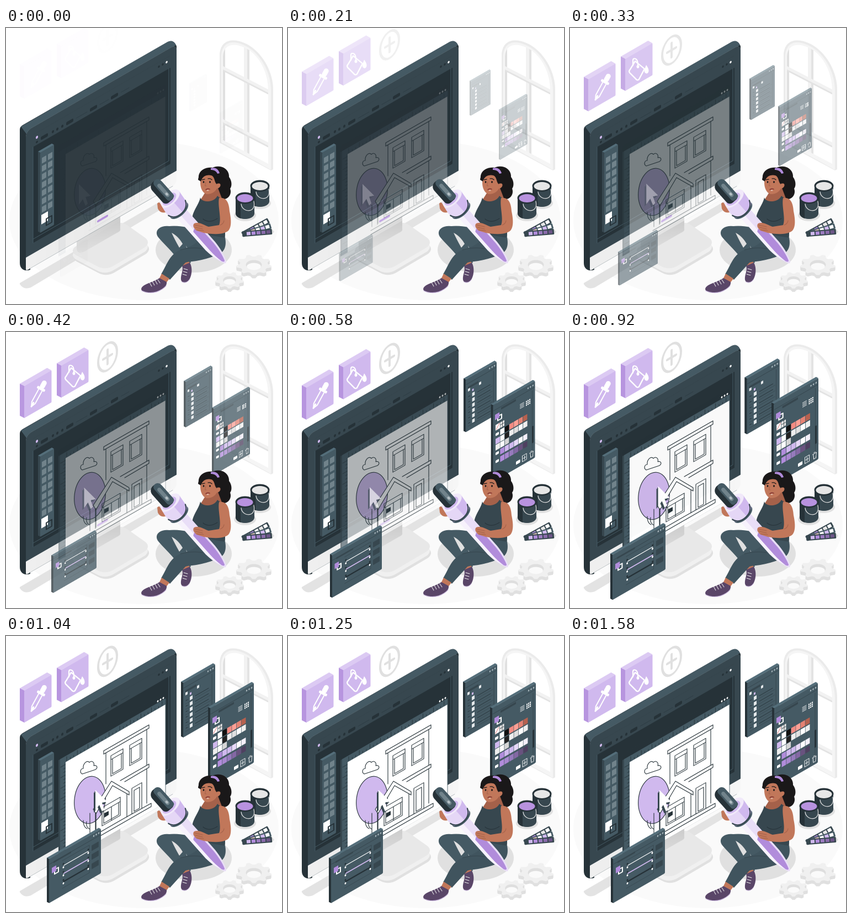
These frames come from a looping animation (500x500 px, 1620 ms). An HTML page with a canvas:

```html
<!DOCTYPE html>
<html lang="en">
<head>
<meta charset="utf-8">
<title>Design workspace</title>
<style>
html, body { margin: 0; width: 100%; height: 100%; overflow: hidden; background: #fff; }
canvas { display: block; width: 500px; height: 500px; }
</style>
</head>
<body>
<canvas id="stage"></canvas>
<script>
const LOOP = 1620, SIZE = 500, SLOPE = -0.577;
const INK = '#263238', DARK = '#37474f', SLATE = '#455a64', LILAC = '#d0b9ee', PURPLE = '#b18cdb';
let c;

// Drawing helpers, all working on the current context
const fill = (d, color) => { c.fillStyle = color; c.fill(new Path2D(d)); };
const line = (d, color = INK, width = 1.1) => {
  c.strokeStyle = color; c.lineWidth = width; c.lineJoin = c.lineCap = 'round';
  c.stroke(new Path2D(d));
};
const box = (x, y, w, h, color, r = 0) => {
  c.fillStyle = color; c.beginPath(); c.roundRect(x, y, w, h, r); c.fill();
};
const oval = (x, y, rx, ry, color, turn = 0) => {
  c.fillStyle = color; c.beginPath(); c.ellipse(x, y, rx, ry, turn, 0, 7); c.fill();
};
const at = (x, y, draw, turn = 0) => {
  c.save(); c.translate(x, y); c.rotate(turn); draw(); c.restore();
};
const iso = (x, y, draw) => {
  c.save(); c.transform(1, SLOPE, 0, 1, x, y); draw(); c.restore();
};
function layer(draw) {
  const canvas = document.createElement('canvas');
  canvas.width = canvas.height = SIZE * 2;
  c = canvas.getContext('2d');
  c.scale(2, 2);
  draw();
  return canvas;
}
function slab(x, y, w, h, face, side, top, draw, depth = 4) {
  const rise = depth * 0.55, right = y + w * SLOPE;
  fill(`M${x - depth} ${y - rise}L${x + w - depth} ${right - rise}L${x + w} ${right}L${x} ${y}z`, top);
  fill(`M${x - depth} ${y - rise}L${x + .5} ${y}V${y + h}L${x - depth} ${y + h - rise}z`, side);
  iso(x, y, () => { box(0, 0, w, h, face, 1.5); draw(); });
}

function gear(x, y, r) {
  const ring = (dy, color) => {
    c.beginPath();
    for (let i = 0; i < 36; i++) {
      const a = (i + .5) * Math.PI / 18, k = i % 4 < 2 ? r : r * .8;
      c.lineTo(x + Math.cos(a) * k, y + dy + Math.sin(a) * k * .58);
    }
    c.closePath(); c.fillStyle = color; c.fill();
  };
  for (let d = 6; d > 0; d--) ring(d, '#e0e0e0');
  ring(0, '#f0f0f0');
  oval(x, y, r * .45, r * .27, '#dedede');
  oval(x, y + 3, r * .4, r * .2, '#fafafa');
}

function bucket(x, y, paint) {
  oval(x, y + 31, 20, 11, '#e0e0e0');
  fill(`M${x - 17} ${y}V${y + 28}a17 10 0 0 0 34 0V${y}z`, DARK);
  fill(`M${x - 17} ${y}V${y + 28}a17 10 0 0 0 9 9V${y}z`, INK);
  oval(x, y, 17.5, 10.5, INK);
  oval(x, y + .5, 14.5, 7.5, paint);
  line(`M${x - 7} ${y + 11}C${x - 5} ${y + 27} ${x + 21} ${y + 28} ${x + 16} ${y + 6}`, '#e6e6e6', 1.2);
}

function archedWindow() {
  fill('M387 208V47C389 22 410 16 436 29C463 43 484 78 484 112V256L480 258z', '#ebebeb');
  fill('M390 207V49C392 25 411 20 435 33C461 46 480 80 480 113V257z', '#f5f5f5');
  c.save();
  c.clip(new Path2D('M393 203V52C394 30 412 25 435 37C460 50 475 82 475 113V246z'));
  c.fillStyle = '#fff'; c.fillRect(380, 10, 110, 250);
  fill('M393 30h4v180h-4z', '#e0e0e0');
  fill('M431 20h10v230h-10z', '#f2f2f2');
  fill('M437 20h4v230h-4z', '#e3e3e3');
  for (const y of [69, 165]) {
    fill(`M393 ${y}L480 ${y + 45}v8L393 ${y + 8}z`, '#f2f2f2');
    fill(`M393 ${y + 6}L480 ${y + 51}v3L393 ${y + 9}z`, '#e3e3e3');
  }
  c.restore();
}

function swatchFan() {
  const tints = [['#fff', PURPLE, '#fff', '#e6e6e6', '#fff'], [LILAC, '#f3c9c2', '#fff', LILAC, '#fff'],
    [LILAC, PURPLE, '#9b7bbf', '#8a6bab', '#6d5688']];
  fill('M426 377L482 374L486 369L470 352z', '#e0e0e0');
  tints.forEach((row, i) => at(431, 373, () => {
    box(-3, -5, 54, 10, i % 2 ? SLATE : DARK, 1.5);
    row.forEach((tint, k) => box(5 + k * 9, -3, 7, 6, tint));
  }, -.5 + i * .21));
}

function monitor() {
  fill('M25 462L285 311V326L45 470Q32 475 25 464z', '#e3e3e3');
  const base = 'M126 396L196 356Q208 350 218 356L252 380Q262 388 252 397L196 430Q180 440 164 431L126 411Q116 403 126 396z';
  at(2, 12, () => fill(base, '#e0e0e0'));
  at(0, 8, () => fill(base, '#f0f0f0'));
  fill(base, '#e8e8e8');
  const neck = c.createLinearGradient(0, 345, 0, 405);
  neck.addColorStop(0, '#cbcbcb'); neck.addColorStop(1, '#e0e0e0');
  fill('M128 380L207 335V364Q208 368 201 371L142 405Q128 411 128 398z', neck);

  fill('M25 184Q25 179 30 176L293 25Q304 20 309 33L309 50L44 200V438Q36 441 30 437Q25 433 25 426z', INK);
  fill('M27 178.5L293 25Q303 20 308 31L50 181Q40 186 37 192z', SLATE);
  iso(36, 187, () => {
    const chin = c.createLinearGradient(0, 0, 273, 0);
    chin.addColorStop(0, '#f0f0f0'); chin.addColorStop(.5, '#e8e8e8'); chin.addColorStop(1, '#f7f7f7');
    box(0, 0, 273, 253, chin, [10, 10, 8, 3]);
    box(0, 0, 273, 229, DARK, [10, 10, 0, 0]);
    line('M4 253H266', '#9fa8ac', .7);
    box(13, 14, 249, 196, INK);
    box(13, 14, 249, 22, DARK);
    line('M259 36V203H13', SLATE, 1);
    line('M13 36V210', '#4b626d', .8);
    box(18, 20, 4, 5, LILAC, 2);
    box(18, 29, 4, 4, INK, 2);
    for (const u of [27, 73, 116, 154]) box(u, 26, 13, 6, INK, 2);
    for (const u of [49, 57, 66]) oval(u, 29, 2, 2.5, INK);
    line('M91 29h20M134 29h16M173 29h14', '#2e3d45', 1);
    for (const u of [241, 248, 255]) oval(u, 22, 1.7, 2, u > 250 ? '#fff' : INK);
    line('M131 238.5h16', PURPLE, 4);
  });

  slab(62, 226, 25, 145, SLATE, DARK, '#546e7a', () => {
    for (let i = 0; i < 14; i++) box(3 + i % 2 * 11, 11 + (i >> 1) * 14.8, 8, 10.5, '#71838b', .5);
    box(2, 114, 12, 17, '#fff');
    c.strokeStyle = INK; c.lineWidth = 2; c.strokeRect(11, 126, 10, 12);
  });
}

function houseDrawing() {
  oval(152, 297, 28, 43, LILAC, .13);
  c.lineWidth = 1.1; c.strokeStyle = INK;
  c.beginPath(); c.ellipse(152, 297, 28, 43, .13, 0, 7); c.stroke();
  line('M152 321V360M162 318V356M140 334Q140 346 147 349M146 336Q144 346 152 350');
  line('M138 250C133 247 135 240 140 240C139 231 147 224 151 229C156 224 161 230 159 235C165 233 167 239 162 242z');
  line('M177 208L259 161V167L177 214zM181 212V268M255 169V234');
  for (const [x, y] of [[190, 217], [224, 198]]) iso(x, y, () => {
    line('M0 0H22V37H0zM0 7H22M3 7V34M19 7V34M3 34H19');
  });
  line('M207 262L259 232V238L215 264M255 241V303');
  fill('M158 314L191 263L223 282V288L193 271L163 322z', '#fff');
  line('M158 314L191 263L223 282V288L193 271L163 322zM219 286V328M163 320V354');
  iso(228, 276, () => line('M0 46V0H18V46M4 44V6H14V44z'));
  iso(174, 311, () => line('M0 0H33V33H0zM0 8H33M17 8V33M3 8V30H30V8'));
  line('M218 328L263 303V309L150 374M218 328L150 367');
  fill('M178 321L186 317V324L178 329z', INK);
}

function appWindow() {
  iso(95, 214, () => {
    box(0, 0, 194, 200, DARK, [3, 3, 0, 0]);
    box(0, 0, 194, 11, INK, [3, 3, 0, 0]);
    box(3, 11, 191, 11, SLATE);
    box(3, 11, 10, 189, SLATE);
    for (const u of [180, 185, 190]) oval(u, 8, 1.4, 1.8, '#fff');
    for (let i = 0; i < 28; i++) line(`M${15 + i * 6.4} 21v${i % 3 ? -3 : -8}`, INK, .8);
    for (let i = 0; i < 27; i++) line(`M13 ${26 + i * 6.4}h${i % 3 ? -4 : -9}`, INK, .8);
    box(13, 22, 181, 178, '#fff');
    line('M194 12V196', SLATE, .8);
  });
  houseDrawing();
}

function pointer() {
  const arrow = 'M162 279L183 300L174 302L178 314L174 318L169 306L162 316z';
  at(-3, 4, () => fill(arrow, DARK));
  at(-1.5, 2, () => fill(arrow, DARK));
  fill(arrow, '#fff');
}

function icons() {
  for (const [x, y] of [[33, 99], [100, 62]])
    slab(x, y, 49.5, 58, LILAC, '#b795df', '#dccaf3', () => {}, 8);
  // Eyedropper
  at(58, 114, () => {
    box(-4.5, -28, 9, 16, '#fff', 4.5);
    box(-8, -14, 16, 5, '#fff', 2);
    line('M-3.5 -9V17L0 25L3.5 17V-9', '#fff', 2);
    line('M0 17V25', '#fff', 3);
  }, .5);
  // Paint bucket
  line('M118 66L135 80L125 99Q122 102 119 98L108 87Q106 84 109 81z', '#fff', 2.4);
  line('M114 74V65Q114 60 119 62Q123 64 123 74', '#fff', 2.2);
  oval(123, 76, 2.5, 3, '#fff');
  fill('M138 73Q144 81 142 86Q139 91 135 86Q134 83 138 73z', '#fff');
  iso(184, 46, () => {
    c.strokeStyle = '#e0e0e0'; c.lineWidth = 4;
    c.beginPath(); c.ellipse(0, 0, 17, 24, 0, 0, 7); c.stroke();
    box(-10, -2.2, 20, 4.4, '#e0e0e0', 2); box(-2, -15, 4, 30, '#e0e0e0', 2);
  });
}

const dots = (u, v) => [0, 4.5, 9].forEach(k => oval(u + k, v, 1.2, 1.5, '#b0bcc1'));
function colorPair(u, v) {
  c.strokeStyle = '#fff'; c.lineWidth = 2; c.strokeRect(u + 5, v + 6, 7, 8);
  box(u, v, 8, 10, PURPLE);
}

function layersPanel() {
  slab(321, 85, 58, 99, SLATE, INK, '#546e7a', () => {
    dots(45, 5);
    line('M1 10H57M52 14V92', DARK, 1);
    box(4, 16, 20, 4, DARK, 1);
    box(4, 20, 4, 5, '#e4e8ea'); box(25, 20, 4, 5, '#e4e8ea'); box(12, 25, 3, 4, LILAC);
    for (let i = 0; i < 6; i++) {
      const v = 32 + i * 10;
      box(12, v, 5, 6.5, '#e4e8ea');
      line(`M22 ${v + 4}H46M5 ${v + 3}h3`, INK, .9);
      line(`M4 ${v + 8.5}H50`, DARK, .6);
    }
  });
}

function colorPanel() {
  const rows = [
    [40, 5, ['#fff', '#e8e8e8']],
    [53.5, 13.5, ['#fff', '#111', '#f28b82', '#ff9f94', '#e58273', '#b6614f']],
    [66, 5, [LILAC, '#fff', '#222', '#eee', '#e0e0e0', '#fff', '#eee']],
    [77.5, 5, ['#eee', '#fff', '#d5d5d5']],
    [90, 13.5, [PURPLE, LILAC, LILAC, '#e7d9f7', '#fff', '#f5f0fa']],
    [104, 13.5, [PURPLE, '#a887cf', '#967abc', '#8467a4', '#69527f', '#4f4060']]];
  slab(370, 131, 79, 144, SLATE, INK, '#546e7a', () => {
    dots(66, 6);
    line('M1 11H78M74 15V138', DARK, 1);
    box(15, 13, 28, 4, DARK, 1);
    colorPair(4, 20);
    for (let i = 0; i < 4; i++) line(`M51 ${28 + i * 2.5}h7`, '#fff', .9);
    for (let i = 0; i < 9; i++) box(62 + i % 3 * 3, 28 + (i / 3 | 0) * 3.4, 2, 2.4, '#fff');
    for (const [v, u, tints] of rows) tints.forEach((tint, i) => box(u + i * 8.6, v, 7.9, 10.5, tint));
    line('M6 49L12 41', '#d66', 1);
    line('M18 40V50M14 45H21', INK, .8);
    for (const v of [56, 92, 107]) box(5, v, 6, 5, '#fff', 1);
    box(73, 82, 3, 32, INK, 1);
    box(43, 131, 8, 6, '#fff', 1);
    line('M55 127h8v11h-8zM59 129v7M56.5 132.5h5M69 130h7M70 130l.8 9h4l.7-9M71 128h3', '#fff', .9);
  });
}

function strokePanel() {
  slab(78, 404, 94, 80, SLATE, INK, '#546e7a', () => {
    dots(81, 5);
    line('M1 10H93', DARK, 1);
    box(8, 9, 32, 3, DARK, 1);
    colorPair(5, 19);
    [['#fff', 1.3], [LILAC, 2], [INK, 2.6]].forEach(([color, width], i) => {
      const v = 27 + i * 14.5;
      line(`M27 ${v}H71`, color, width);
      for (const u of [26, 71]) { oval(u, v + 3, 1.4, 1.8, '#fff'); oval(u, v - 3, 1.4, 1.8, INK); }
    });
    for (const v of [20, 36, 53]) box(77, v, 13, 10, DARK, 1);
    line('M24 17H73V67H24', DARK, .8);
  });
}

function stylus() {
  at(268, 280, () => {
    fill('M62 -11.5H154Q178 -10 192 -4Q199 0 192 3Q176 10 154 11.5H62z', '#e9def7');
    fill('M62 3H188Q172 10 154 11.5H62z', '#f7f2fc');
    fill('M114 -8H154Q176 -7 190 -2Q194 0 188 3Q174 6 160 6H114Q108 -1 114 -8z', PURPLE);
    // Collar
    oval(68, -.5, 10, 20.5, SLATE);
    fill('M40 -24L65 -21V20L40 20z', LILAC);
    oval(65, -.5, 10, 20.5, LILAC);
    fill('M43 -3H75Q73 18 62 20H43z', '#e5d7f6');
    line('M62 -21Q75 -16 75 0Q75 16 62 20', DARK, 2.2);
    oval(41, -2, 11, 22, '#f1e9fa');
    oval(41, -1, 8, 15, LILAC);
    // Grip
    box(-2, -12, 47, 24, INK, [11, 8, 8, 11]);
    box(-2, -12, 46, 15, SLATE, [11, 6, 6, 9]);
    box(7, -7, 30, 7, '#71838b', 3.5);
    oval(31, -3.5, 3, 2.3, '#b4c0c5');
  }, .844);
}

function woman() {
  const skin = '#c1775a', shade = '#a5614a', shoe = '#5a4668', hair = '#1a1819';
  oval(340, 402, 69, 41, '#e0e0e0');
  fill('M350 276C345 262 358 251 374 253C390 246 405 256 404 270C409 276 410 286 406 291C410 301 402 312 391 310C383 311 382 303 384 297L380 280z', hair);
  fill('M371 254Q383 251 387 263L383 264Q380 257 371 257z', PURPLE);
  fill('M362 296L384 290L392 311L374 322L352 312z', shade);
  fill('M353 272C350 284 354 299 364 301Q376 301 382 291C390 290 391 279 383 282L379 270Q366 262 353 272z', skin);
  fill('M348 275C349 262 364 256 376 260C385 266 386 276 382 283C377 280 379 270 372 267C364 265 356 268 353 278z', hair);
  oval(358, 279, 1.3, 1.8, hair); oval(369.5, 279, 1.4, 1.8, hair);
  line('M355 275L360 274M366 273Q370 272 373 275', hair, 1.3);
  line('M362 279L360.5 286H363', shade, .9);
  line('M362 293Q365 290 369 292', '#7c302f', 1.4);
  line('M364 294.5H367', '#fff', .8);

  fill('M397 382C396 404 370 414 330 402L326 394L335 425L317 430C310 412 286 392 275 378C268 366 280 357 296 359C330 356 360 372 397 382z', SLATE);
  fill('M300 371Q312 377 320 391L314 398Q306 384 300 371z', '#e0e0e0');
  fill('M319 427L332 423L333 431L321 434z', skin);
  fill('M319 431L333 425C338 434 337 446 333 454C329 463 319 464 317 456C316 446 322 440 319 431z', shoe);
  line('M322 436l7 2M321 441l7 2M320 446l7 2', '#eee', 1);
  line('M332 456Q327 463 319 460', '#c8b6dc', 1);

  fill('M352 307C354 316 376 318 383 304L391 311C387 322 389 336 393 346C397 360 398 372 396 386L352 375C350 358 336 354 338 340C341 328 350 318 352 307z', DARK);
  line('M357 346Q368 355 383 345', INK, 1);
  fill('M397 380C400 396 396 408 378 413C356 421 340 423 326 424L297 456L281 446C292 428 296 410 316 402C336 396 350 390 354 373z', '#40545e');
  line('M316 402Q338 396 356 400', DARK, 1);
  fill('M282 445L296 454L290 462L277 455z', skin);
  fill('M278 453L291 460C292 468 284 473 274 477C262 482 246 480 245 473C246 464 264 462 278 453z', shoe);
  line('M246 476Q258 482 273 478Q284 474 290 467', '#c8b6dc', 1.2);
  line('M260 461l4 7M265 459l4 7M270 457l4 7M275 456l4 6', '#eee', 1);

  stylus();
  fill('M274 318Q278 313 281 321L289 334Q279 336 275 327z', skin);
  fill('M386 308C399 306 404 316 405 332C408 346 409 360 403 367C394 375 374 374 358 371L345 367Q336 359 341 354C350 350 360 358 367 360L386 357C391 346 383 322 386 308z', skin);
  line('M388 357Q394 355 395 349M342 357L356 360M343 361L356 364M346 366L358 367', shade, 1);
}

const scenery = layer(() => {
  oval(250, 349, 244, 144, '#fafafa');
  archedWindow();
  gear(449, 429, 32);
  gear(405, 457, 26);
  bucket(460, 286, '#e6e6e6');
  bucket(433, 308, '#b892df');
  swatchFan();
  monitor();
});
const canvasLayer = layer(appWindow), pointerLayer = layer(pointer), iconLayer = layer(icons);
const panels = [[layersPanel, 348, 117.5], [colorPanel, 408, 179], [strokePanel, 123, 417]]
  .map(([draw, x, y]) => ({ image: layer(draw), x, y }));
const person = layer(woman);

const clamp = v => Math.max(0, Math.min(1, v));
// Cubic bezier (.36, -.01, .5, 1.38): rises past one, then settles
function spring(x) {
  if (x >= 1) return 1;
  let low = 0, high = 1;
  const curve = (s, a, b) => 3 * s * (1 - s) * ((1 - s) * a + s * b) + s ** 3;
  for (let i = 0; i < 24; i++) {
    const mid = (low + high) / 2;
    if (curve(mid, .36, .5) < x) low = mid; else high = mid;
  }
  return curve(low, -.01, 1.38);
}

const stage = document.getElementById('stage');
const ratio = window.devicePixelRatio || 1;
stage.width = stage.height = SIZE * ratio;
const screen2d = stage.getContext('2d');

function put(image, alpha = 1, dx = 0, dy = 0) {
  screen2d.globalAlpha = clamp(alpha);
  screen2d.drawImage(image, dx, dy, SIZE, SIZE);
}

function render(ms) {
  const t = ms / 1000;
  const fade = .05 + t, drop = spring(.1 + 1.3 * t);
  const zoom = spring(.06 + .95 * t), glide = spring((t + .06) / 1.62);
  screen2d.setTransform(ratio, 0, 0, ratio, 0, 0);
  screen2d.globalAlpha = 1;
  screen2d.fillStyle = '#fff';
  screen2d.fillRect(0, 0, SIZE, SIZE);
  put(scenery);
  put(canvasLayer, fade);
  put(pointerLayer, fade, 30 * (glide - 1), 4 * (1 - glide));
  put(iconLayer, drop, 0, 30 * (drop - 1));
  for (const { image, x, y } of panels) {
    const scale = .5 + zoom / 2;
    screen2d.save();
    screen2d.translate(x, y);
    screen2d.scale(scale, scale);
    put(image, zoom * 1.15, -x, -y);
    screen2d.restore();
  }
  put(person);
}

const start = performance.now();
function tick() {
  render((performance.now() - start) % LOOP);
  requestAnimationFrame(tick);
}
tick();
</script>
</body>
</html>
```
